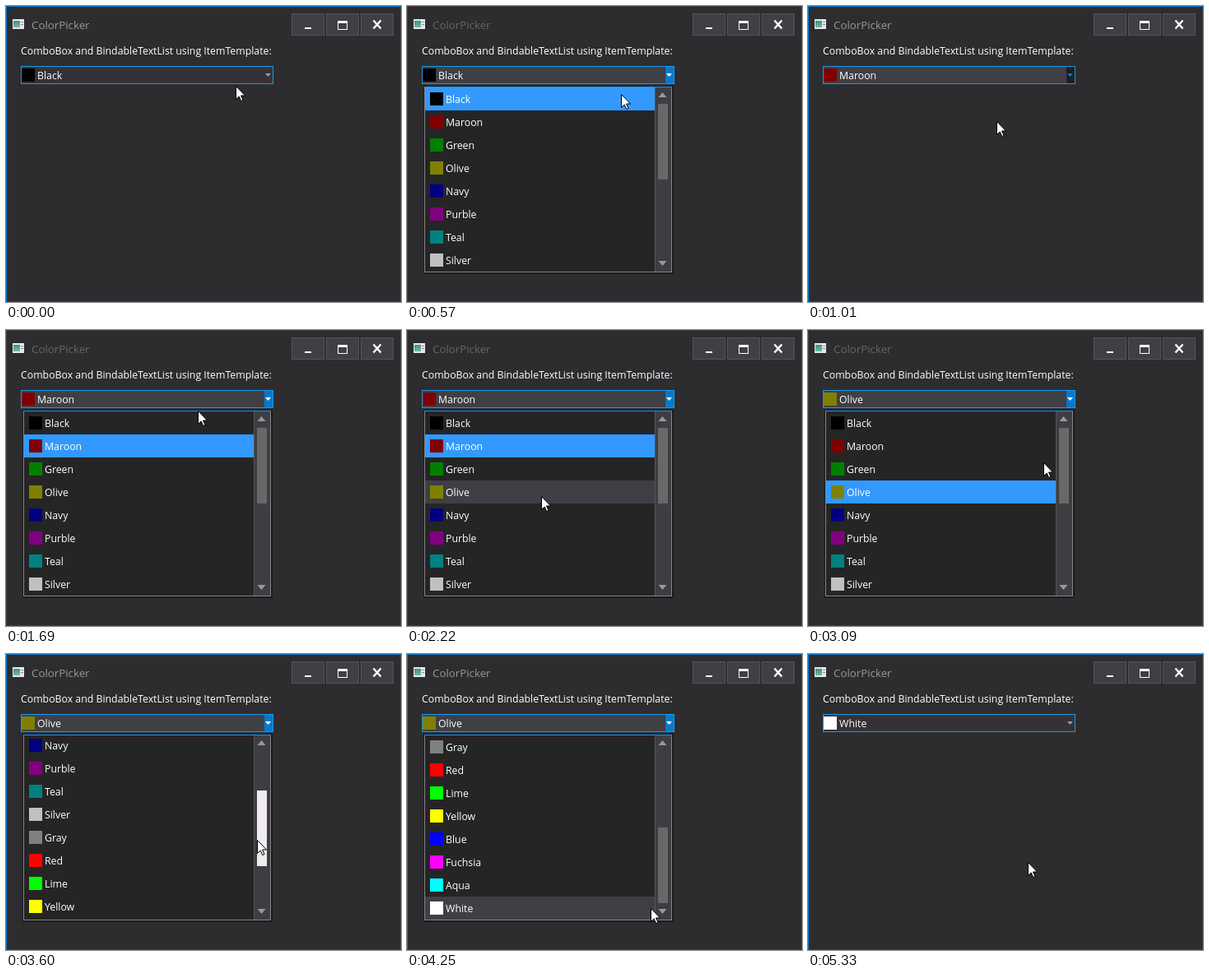
Recreate the animation shown at these times as an HTML page. Size 480 px wide and 360 px high, loop 5890 ms.

```html
<!DOCTYPE html>
<html lang="en">
<head>
<meta charset="utf-8">
<title>ColorPicker</title>
<style>
  html, body { margin: 0; width: 100%; height: 100%; overflow: hidden; background: #2d2d30; }
  svg { display: block; width: 480px; height: 360px; font: 12.3px "Open Sans", "Noto Sans", sans-serif; fill: #fff; }
  .crisp { shape-rendering: crispEdges; }
  .title { font-size: 13.3px; }
  .frame { fill: none; stroke: #3f3f46; }
  .button { fill: #3f3f46; stroke: #545459; }
</style>
</head>
<body>
<svg viewBox="0 0 480 360">
  <defs>
    <clipPath id="viewport"><rect x="22" y="99" width="279" height="224"/></clipPath>
    <linearGradient id="teal" x2="0" y2="1">
      <stop stop-color="#3f8f86"/><stop offset="1" stop-color="#78b8a4"/>
    </linearGradient>
  </defs>

  <rect width="480" height="360" fill="#2d2d30"/>
  <g class="crisp">
    <path class="frame" d="M479.5 0V359.5H0"/>
    <path id="edge" fill="none" d="M.5 360V.5H480"/>
    <rect x="8" y="16" width="14" height="12" fill="#e8e8e8"/>
    <rect x="9" y="18" width="8" height="8" fill="url(#teal)"/>
    <path d="M18 19h3M18 22h3" stroke="#888"/>
    <g class="button">
      <rect x="347.5" y="9.5" width="39" height="26"/>
      <rect x="389.5" y="9.5" width="39" height="26"/>
      <rect x="431.5" y="9.5" width="39" height="26"/>
    </g>
    <path d="M363 26h8v2h-8z"/>
    <path fill-rule="evenodd" d="M403 18h12v11h-12zM404 21v7h10v-7z"/>
  </g>
  <path d="M446.5 17.5l9 10m0-10l-9 10" stroke="#fff" stroke-width="2.4"/>
  <text id="title" class="title" x="31" y="28">ColorPicker</text>
  <text x="18" y="59">ComboBox and BindableTextList using ItemTemplate:</text>

  <rect id="combo" class="crisp" x="18.5" y="73.5" width="306" height="21" stroke="#1c97ea"/>
  <rect id="drop" class="crisp" x="314" y="74" width="10" height="20"/>
  <path id="arrow" d="M315 82h7l-3.5 4z"/>
  <rect id="swatch" class="crisp" x="19" y="76" width="16" height="16"/>
  <text id="value" x="38" y="89"></text>

  <g id="popup">
    <g class="crisp">
      <rect x="20" y="97" width="304" height="229" fill="#1b1b1c"/>
      <rect x="21.5" y="98.5" width="300" height="225" fill="#252526" stroke="#85858a"/>
      <path d="M21 98.5h301" stroke="#1c97ea"/>
      <rect x="302" y="99" width="19" height="224" fill="#3e3e42"/>
      <path d="M301.5 99v224" stroke="#555558"/>
      <rect id="thumb" x="305" width="12" height="92"/>
    </g>
    <path d="M305.500 111l5-6 5 6zM305.500 310l5 6 5-6z" fill="#999"/>
    <g clip-path="url(#viewport)"><g id="rows"></g></g>
  </g>

  <path id="cursor" d="M.5 .5V16.500L4.200 13L6.700 18.500L9 17.500L6.500 12H11.500Z" stroke="#000"/>
</svg>
<script>
const LOOP = 5890, ROW = 28, TOP = 99, THUMB_TOP = 119, THUMB_TRAVEL = 92;
const COLORS = [
  ['Black', '#000'], ['Maroon', '#800000'], ['Green', '#008000'], ['Olive', '#808000'],
  ['Navy', '#000080'], ['Purble', '#800080'], ['Teal', '#008080'], ['Silver', '#c0c0c0'],
  ['Gray', '#808080'], ['Red', '#f00'], ['Lime', '#0f0'], ['Yellow', '#ff0'],
  ['Blue', '#00f'], ['Fuchsia', '#f0f'], ['Aqua', '#0ff'], ['White', '#fff']
];
// Pointer stops: time, x, y
const PATH = [
  [0, 279, 97], [29, 279, 97], [70, 277, 88], [400, 277, 88], [870, 229, 140],
  [1010, 229, 140], [1500, 240, 88], [1640, 240, 88], [2220, 163, 202],
  [2300, 163, 202], [2820, 268, 88], [2950, 268, 88], [3090, 286, 161],
  [3340, 306, 179], [3480, 306, 179], [3600, 305, 226], [3970, 296, 309],
  [4250, 296, 309], [4620, 246, 303], [5100, 246, 303], [5330, 267, 253], [LOOP, 267, 253]
];
const $ = id => document.getElementById(id);
const within = (t, a, b) => t >= a && t < b;
const fill = (node, color) => node.setAttribute('fill', color);
const clamp = (v, a, b) => Math.min(b, Math.max(a, v));

function add(parent, tag, attrs, text = '') {
  const node = document.createElementNS('http://www.w3.org/2000/svg', tag);
  for (const key in attrs) node.setAttribute(key, attrs[key]);
  node.textContent = text;
  return parent.appendChild(node);
}

const rows = COLORS.map(([name, color], i) => {
  const y = TOP + i * ROW;
  const back = add($('rows'), 'rect', { x: 22, y, width: 279, height: ROW, class: 'crisp' });
  add($('rows'), 'rect', { x: 28, y: y + 6, width: 16, height: 16, fill: color, class: 'crisp' });
  add($('rows'), 'text', { x: 47, y: y + 19 }, name);
  return back;
});

function pointer(t) {
  const i = PATH.findIndex(p => p[0] > t);
  const [t0, x0, y0] = PATH[i - 1], [t1, x1, y1] = PATH[i];
  const k = (t - t0) / (t1 - t0);
  return [Math.round(x0 + (x1 - x0) * k), Math.round(y0 + (y1 - y0) * k)];
}

function render(t) {
  const [x, y] = pointer(t);
  const open = within(t, 420, 1010) || within(t, 1640, 2300) || within(t, 2950, 4760);
  const active = !open || t >= 3480;
  const pressed = open || within(t, 280, 420) || within(t, 1500, 1640) || within(t, 2820, 2950);
  const justClosed = within(t, 1010, 1055) || within(t, 2300, 2345) || within(t, 4760, 4890);
  const hot = pressed || justClosed || y < 95;
  const selected = t < 1010 ? 0 : t < 2300 ? 1 : t < 4760 ? 3 : 15;

  $('edge').setAttribute('stroke', active ? '#007acc' : '#434346');
  fill($('title'), active ? '#999' : '#656565');
  fill($('combo'), hot ? '#3f3f46' : '#333337');
  fill($('drop'), pressed ? '#007acc' : hot ? '#1f1f20' : '#333337');
  fill($('arrow'), pressed ? '#fff' : hot ? '#007acc' : '#999');
  fill($('swatch'), COLORS[selected][1]);
  $('value').textContent = COLORS[selected][0];

  const drag = t < 3480 ? 0 : clamp(y - 179, 0, THUMB_TRAVEL);
  const scroll = Math.round(drag / THUMB_TRAVEL * 8 * ROW);
  const overThumb = x >= 304 && y >= THUMB_TOP;
  const hover = y < TOP || within(t, 2950, 4250) ? -1 : Math.floor((y - TOP + scroll) / ROW);
  $('popup').setAttribute('visibility', open ? 'visible' : 'hidden');
  $('thumb').setAttribute('y', THUMB_TOP + drag);
  fill($('thumb'), within(t, 3480, 4250) ? '#efebef' : overThumb ? '#9e9e9e' : '#686868');
  $('rows').setAttribute('transform', `translate(0 ${-scroll})`);
  rows.forEach((row, i) => fill(row, i === selected ? '#39f' : i === hover ? '#3f3f46' : '#252526'));
  $('cursor').setAttribute('transform', `translate(${x} ${y})`);
}

function tick() {
  render(performance.now() % LOOP);
  requestAnimationFrame(tick);
}
tick();
</script>
</body>
</html>
```
